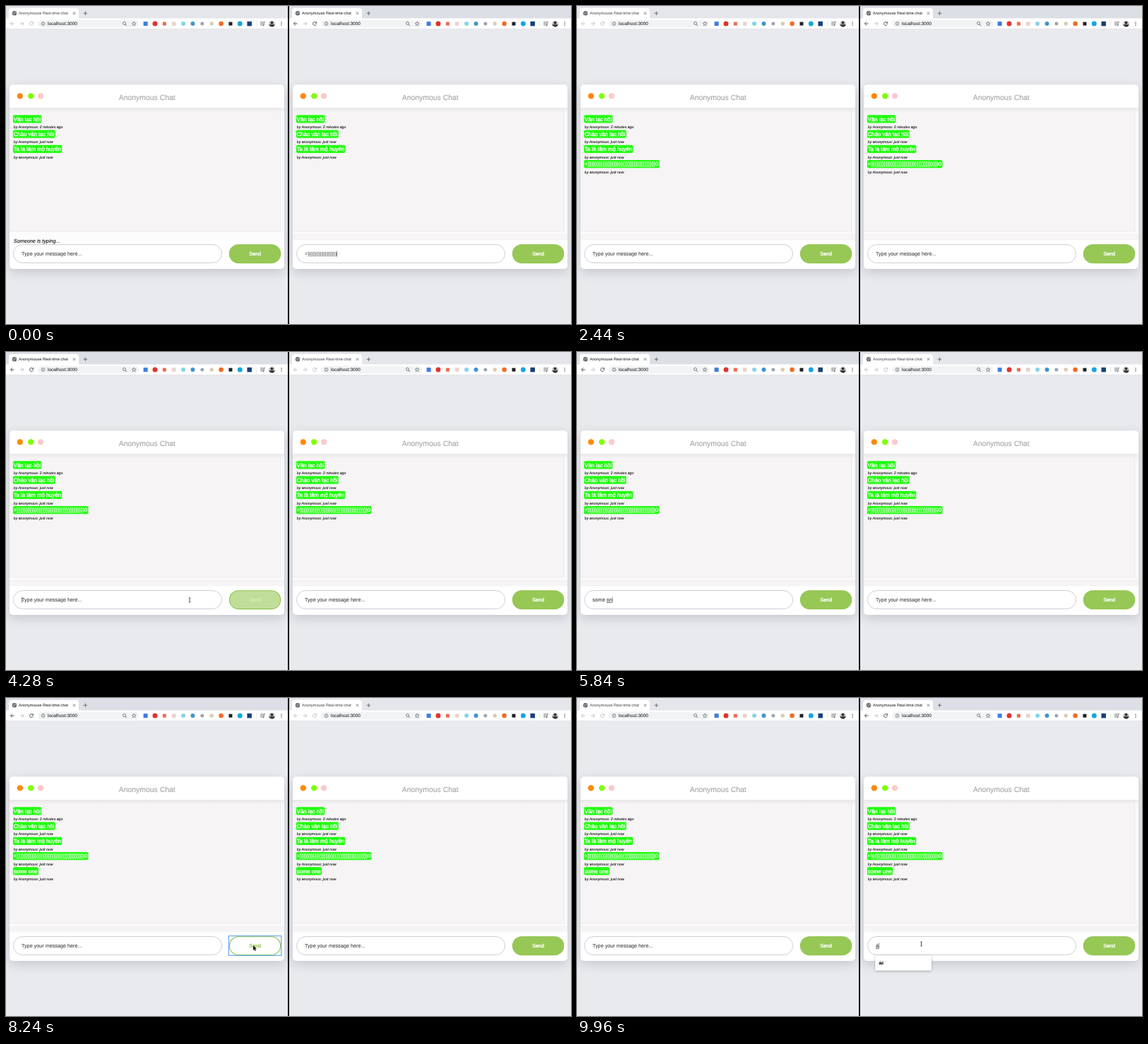
Write an HTML page with a canvas that moves like this. It is 800 px wide and 450 px high and loops after 10000 ms.

```html
<!DOCTYPE html>
<html lang="en">
<head>
<meta charset="utf-8">
<title>Anonymous Chat</title>
<style>
html, body { margin: 0; width: 100%; height: 100%; overflow: hidden; background: #e8eaee; }
canvas { display: block; width: 800px; height: 450px; }
</style>
</head>
<body>
<canvas id="stage" width="800" height="450"></canvas>
<script>
const ctx = document.getElementById('stage').getContext('2d');
const LOOP = 10000;
const SANS = '"Liberation Sans", Arial, sans-serif';
const WHITE = [255, 255, 255], GREEN = [151, 200, 86];
const INPUT_FONT = 7.22;
const LAUGH = 37;

// Times of the main events
const SENT_RIGHT = 1940, LEFT_ACTIVE = 3700, SENT_LEFT = 8100, RIGHT_ACTIVE = 8840;

const messages = [
  { text: 'Vân lạc hồi', ago: '2 minutes ago', by: ['Anonymous', 'Anonymous'], at: [0, 0] },
  { text: 'Chào vân lạc hồi', ago: 'just now', by: ['Anonymous', 'anonymous'], at: [0, 0] },
  { text: 'Ta là lâm mộ huyên', ago: 'just now', by: ['anonymous', 'Anonymous'], at: [0, 0] },
  { text: '=' + ')'.repeat(LAUGH) + '0', ago: 'just now', by: ['anonymous', 'Anonymous'], at: [1980, SENT_RIGHT] },
  { text: 'some one', ago: 'just now', by: ['Anonymous', 'anonymous'], at: [SENT_LEFT, 8140] }
];

// [time, text, underlined word]
const leftKeys = [
  [0, ''], [4260, ''], [5040, 's', 's'], [5120, 'so', 'so'], [5360, 'som', 'som'],
  [5440, 'some', 'some'], [5560, 'some '], [5640, 'some o', 'o'], [5840, 'some on', 'on'],
  [5920, 'some one', 'one'], [6080, 'some one '], [6320, 'some one l'],
  [7440, 'some one '], [7520, 'some one'], [SENT_LEFT, '']
];
const rightKeys = [[SENT_RIGHT, ''], [RIGHT_ACTIVE, ''], [9800, 'a', 'a'], [9880, 'á', 'á']];

// [time, x, y]
const pointerPath = [
  [2900, 618, 350], [3600, 352, 352], [4000, 352, 352], [4220, 260, 351], [4320, 260, 351],
  [4540, 246, 250], [7560, 246, 250], [7960, 350, 350], [8610, 350, 350],
  [8720, 448.5, 352.5], [8860, 448.5, 352.5], [9060, 487.5, 348]
];

// [colour, round, size]
const extensions = [
  ['#3f7de0', 0, 6], ['#e0342c', 1, 7], ['#f0694f', 0, 5], ['#e9d3cd', 0, 5.5],
  ['#86d3ea', 1, 6], ['#3f93cc', 1, 6], ['#a0a4a8', 1, 5], ['#dccbb2', 1, 5.5],
  ['#f26a22', 1, 6.5], ['#202124', 0, 5], ['#17a6df', 1, 7], ['#173f7c', 0, 6.5]
];

const clamp = v => Math.max(0, Math.min(1, v));
const ramp = (t, start, span) => clamp((t - start) / span);
const smooth = u => u * u * (3 - 2 * u);
const lastBefore = (keys, t) => keys.filter(k => k[0] <= t).pop();

function rect(x, y, w, h, fill) {
  ctx.fillStyle = fill;
  ctx.fillRect(x, y, w, h);
}

function pill(x, y, w, h, r, fill, stroke, width = 1) {
  ctx.beginPath();
  ctx.roundRect(x, y, w, h, r);
  if (fill) { ctx.fillStyle = fill; ctx.fill(); }
  if (stroke) { ctx.strokeStyle = stroke; ctx.lineWidth = width; ctx.stroke(); }
}

function disc(x, y, r, fill) {
  ctx.beginPath();
  ctx.arc(x, y, r, 0, Math.PI * 2);
  ctx.fillStyle = fill;
  ctx.fill();
}

function ring(x, y, r, color, width, from = 0, to = Math.PI * 2) {
  ctx.beginPath();
  ctx.arc(x, y, r, from, to);
  ctx.strokeStyle = color;
  ctx.lineWidth = width;
  ctx.stroke();
}

function line(color, width, ...pts) {
  ctx.beginPath();
  for (let i = 0; i < pts.length; i += 2) ctx.lineTo(pts[i], pts[i + 1]);
  ctx.strokeStyle = color;
  ctx.lineWidth = width;
  ctx.stroke();
}

// A thin outline gives small text a little more weight
function label(str, x, y, size, color, { style = '', align = 'left', outline = 0.1 } = {}) {
  ctx.font = `${style} ${size}px ${SANS}`;
  ctx.textAlign = align;
  ctx.fillStyle = ctx.strokeStyle = color;
  ctx.lineWidth = outline;
  ctx.fillText(str, x, y);
  ctx.strokeText(str, x, y);
}

function widthOf(str, size) {
  ctx.font = `${size}px ${SANS}`;
  return ctx.measureText(str).width;
}

function shadow(color, blur, dy) {
  ctx.shadowColor = color;
  ctx.shadowBlur = blur;
  ctx.shadowOffsetY = dy;
}
const noShadow = () => shadow('transparent', 0, 0);

function arrow(x, dir, color) {
  line(color, 0.9, x - 2.6 * dir, 25, x + 2.6 * dir, 25);
  line(color, 0.9, x, 22.4, x + 2.6 * dir, 25, x, 27.6);
}

function star(x, y, r) {
  ctx.beginPath();
  for (let i = 0; i < 10; i++) {
    const a = -Math.PI / 2 + i * Math.PI / 5, d = i % 2 ? r * 0.45 : r;
    ctx.lineTo(x + d * Math.cos(a), y + d * Math.sin(a));
  }
  ctx.closePath();
  ctx.strokeStyle = '#5f6368';
  ctx.lineWidth = 0.7;
  ctx.stroke();
}

function drawBrowser(active) {
  const dark = active ? '#45494e' : '#babcbe', faint = '#babcbe', gray = '#5f6368';
  rect(0, 0, 400, 18, active ? '#dcdfe5' : '#e4e6eb');
  pill(4, 3, 99, 16, [4, 4, 0, 0], '#fff');
  rect(0, 17.5, 400, 15, '#fff');
  rect(0, 32.3, 400, 0.6, '#dcdee2');

  disc(12, 10.3, 3.2, gray);
  line('#fff', 0.6, 9.6, 9.4, 11.8, 10.4, 11.2, 12.6);
  line('#fff', 0.6, 12.6, 7.8, 13, 9.6, 14.8, 10.2);
  label('Anonymouse Real-time chat', 18, 12.2, 5.57, active ? '#3c4043' : '#63676b');
  line(gray, 0.8, 94.8, 8.6, 98.2, 12);
  line(gray, 0.8, 98.2, 8.6, 94.8, 12);
  line(gray, 0.9, 109.7, 10.3, 115.1, 10.3);
  line(gray, 0.9, 112.4, 7.6, 112.4, 13);

  arrow(9, -1, dark);
  arrow(22.5, 1, faint);
  ring(36, 25, 2.5, dark, 0.9, 0.3, 5.4);
  line(dark, 0.9, 38.6, 22, 38.6, 24.3, 36.4, 24.3);

  pill(45, 19.8, 143, 10.6, 5.3, '#f1f3f4');
  ring(52.5, 25, 2.4, gray, 0.7);
  line(gray, 0.7, 52.5, 24.6, 52.5, 26.5);
  rect(52.1, 23.3, 0.8, 0.7, gray);
  label('localhost:3000', 59, 27.3, 6.5, '#303336');
  ring(167.5, 24.4, 2, gray, 0.8);
  line(gray, 0.9, 169, 26, 171, 28);
  star(181.2, 25.1, 3.1);

  extensions.forEach(([color, round, size], i) => {
    const x = 197.6 + i * 13.37;
    if (round) disc(x, 25.1, size / 2, color);
    else rect(x - size / 2, 25.1 - size / 2, size, size, color);
  });
  rect(354.6, 21, 0.6, 8, '#d5d7da');

  for (let i = 0; i < 3; i++) line(gray, 0.8, 360, 22.8 + i * 2, i < 2 ? 364.5 : 363, 22.8 + i * 2);
  line(gray, 0.8, 365.2, 27, 365.2, 22.6, 367, 22.6);
  disc(364.4, 27.2, 1, gray);

  disc(376.5, 25.1, 4.4, '#c9c7c7');
  disc(376.5, 23.7, 2, '#34302f');
  ctx.beginPath();
  ctx.arc(376.5, 25.1, 4.4, 0.25, Math.PI - 0.25);
  ctx.fillStyle = '#34302f';
  ctx.fill();
  for (let i = -1; i < 2; i++) disc(390, 25.1 + i * 2.2, 0.75, gray);
}

function drawCard(typing) {
  shadow('rgba(60,65,80,.2)', 15, 5);
  pill(5, 111.3, 389, 260.7, 5, '#fff');
  noShadow();
  rect(5, 144, 389, 187.3, '#f6f4f5');
  rect(389, 144, 5, 175, '#f9f8f9');
  const fade = ctx.createLinearGradient(0, 144, 0, 151);
  fade.addColorStop(0, 'rgba(0,0,0,.055)');
  fade.addColorStop(1, 'rgba(0,0,0,0)');
  rect(5, 144, 389, 7, fade);
  rect(388.2, 144, 0.7, 175, '#e9e7e8');
  rect(5, 318.6, 384, 0.8, '#e6e4e5');
  rect(5, 319.5, 389, typing ? 12 : 2.3, '#fdfcfd');

  disc(19.8, 127.4, 4.2, '#ff8a0a');
  disc(35.2, 127.4, 4.2, '#80ff00');
  disc(49, 127.4, 4.2, '#fbcaca');
  label('Anonymous Chat', 199.7, 132.8, 10.43, '#a3a3a5', { align: 'center' });
  if (typing) label('Someone is typing...', 10.8, 334.8, 7.28, '#111', { style: 'italic' });
}

function drawMessages(side, t) {
  messages.forEach((m, i) => {
    if (t < m.at[side]) return;
    const y = i * 21.25;
    pill(9.9, 154.2 + y, widthOf(m.text, 7.78) + 2, 11.4, 2, '#1fff0d');
    label(m.text, 10.7, 162.5 + y, 7.78, '#fff', { outline: 0.3 });
    label(`by ${m.by[side]}: ${m.ago}`, 10.8, 173 + y, 5.2, '#111', { style: 'italic' });
  });
}

function drawInput(value, mark, caret) {
  const x = 22;
  pill(10.5, 337.6, 295, 25.9, 13, '#fff', '#c9c6cf', 0.9);
  label(value || 'Type your message here...', x, 353.3, INPUT_FONT, value ? '#3c3c3e' : '#46474b');
  const end = x + widthOf(value, INPUT_FONT);
  if (mark) rect(end - widthOf(mark, INPUT_FONT), 354.3, widthOf(mark, INPUT_FONT), 0.7, '#333');
  if (caret) rect(end + 0.1, 346.6, 0.6, 8.2, '#333');
}

function drawButton(hover, focused) {
  const mix = (from, to) => `rgb(${from.map((v, i) => v + (to[i] - v) * hover)})`;
  pill(316.4, 337.7, 72.3, 25.9, 12.95, mix(GREEN, WHITE), '#90c44c', 1.1);
  label('Send', 352.6, 353.1, INPUT_FONT, mix(WHITE, GREEN), { align: 'center', outline: 0.35 });
  if (focused) {
    ctx.strokeStyle = '#69aef2';
    ctx.lineWidth = 1.3;
    ctx.strokeRect(315.4, 336.7, 74.4, 27.6);
  }
}

function drawHint(word) {
  shadow('rgba(0,0,0,.3)', 3, 1);
  pill(21.2, 364, 79.8, 21.8, 1, '#fff');
  noShadow();
  label(word, 26.4, 377.2, 5.8, '#111', { outline: 0.25 });
}

function drawWindow(side, state, t) {
  ctx.save();
  ctx.translate(side * 401, 0);
  drawBrowser(state.active);
  drawCard(state.typing);
  drawMessages(side, t);
  drawInput(state.value, state.mark, state.caret);
  drawButton(state.hover, state.focused);
  if (state.hint) drawHint(state.hint);
  ctx.restore();
}

function drawBeam(x, y) {
  line('#222', 0.8, x, y - 3, x, y + 3);
  for (const d of [-1, 1]) line('#222', 0.7, x - 1.2, y + 3 * d, x + 1.2, y + 3 * d);
}

function drawArrow(x, y) {
  const shape = [0, 0, 0, 7, 1.6, 5.6, 2.7, 8, 3.8, 7.5, 2.8, 5.2, 4.9, 5.1];
  ctx.beginPath();
  for (let i = 0; i < shape.length; i += 2) ctx.lineTo(x + shape[i], y + shape[i + 1]);
  ctx.closePath();
  ctx.lineWidth = 1;
  ctx.strokeStyle = '#fff';
  ctx.stroke();
  ctx.fillStyle = '#111';
  ctx.fill();
}

function drawPointer(t, leftActive) {
  if (t < 2900 || (t >= 5040 && t < 7560)) return;
  const i = pointerPath.findLastIndex(p => p[0] <= t);
  const a = pointerPath[i], b = pointerPath[i + 1] || a;
  const u = a === b ? 0 : smooth((t - a[0]) / (b[0] - a[0]));
  const x = a[1] + (b[1] - a[1]) * u, y = a[2] + (b[2] - a[2]) * u;
  const localX = x - (leftActive ? 0 : 401);
  const overInput = localX > 10 && localX < 306 && y > 337 && y < 364;
  (overInput ? drawBeam : drawArrow)(x, y);
}

function rightField(t) {
  if (t >= SENT_RIGHT) return lastBefore(rightKeys, t);
  const count = Math.min(LAUGH, 17 + Math.floor(t / 74));
  return [t, '=' + ')'.repeat(count) + (t >= 1720 ? '0' : '')];
}

function render(t) {
  const leftActive = t >= LEFT_ACTIVE && t < RIGHT_ACTIVE;
  const blink = key => (t - key[0]) % 1000 < 500;
  const left = lastBefore(leftKeys, t), right = rightField(t);
  const hover = ramp(t, LEFT_ACTIVE, 250) - ramp(t, 4100, 300)
              + ramp(t, 7880, 250) - ramp(t, 8670, 300);

  rect(0, 0, 800, 450, '#e8eaee');
  drawWindow(0, {
    active: leftActive,
    typing: t < 2160,
    value: left[1], mark: left[2],
    caret: t >= 4260 && t < SENT_LEFT && blink(left),
    hover,
    focused: t >= SENT_LEFT - 60 && t < RIGHT_ACTIVE,
    hint: t >= 5040 && t < 5200 && 'some'
  }, t);
  drawWindow(1, {
    active: !leftActive,
    value: right[1], mark: right[2],
    caret: !leftActive && blink(right),
    hover: 0,
    hint: t >= 9800 && 'ád'
  }, t);
  rect(399, 0, 2, 450, '#0c0c0e');
  drawPointer(t, leftActive);
}

ctx.textRendering = 'geometricPrecision';
ctx.lineJoin = 'round';
const start = performance.now();
function tick() {
  render((performance.now() - start) % LOOP);
  requestAnimationFrame(tick);
}
tick();
</script>
</body>
</html>
```
